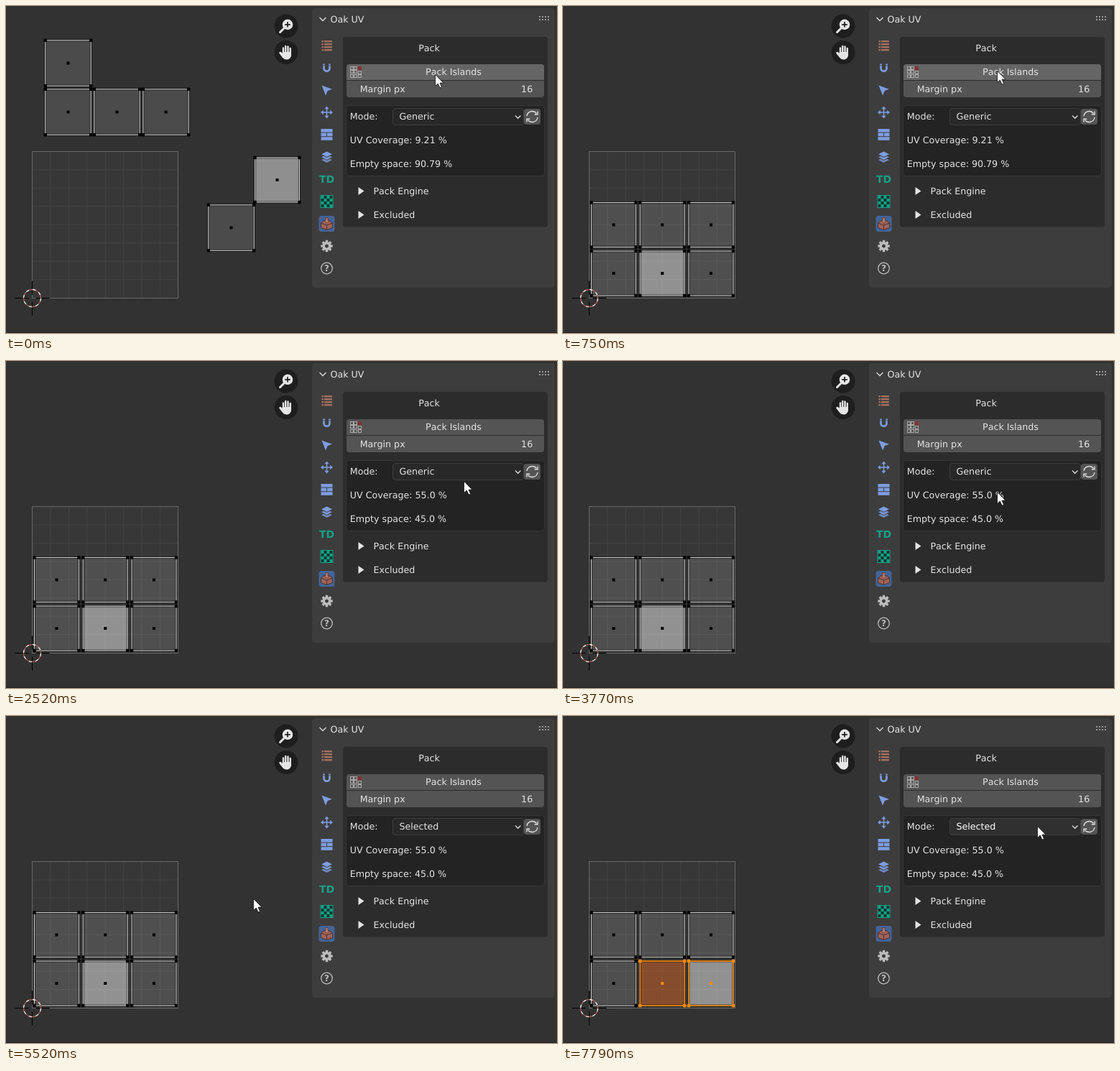
Animation, 767 px wide and 455 px high, one loop 8 s. Source, as an HTML page:

```html
<!DOCTYPE html>
<html lang="en">
<head>
<meta charset="utf-8">
<title>UV packing demo</title>
<style>
  html, body { margin: 0; width: 100%; height: 100%; overflow: hidden; background: #323232; }
  svg { display: block; width: 767px; height: 455px; }
  text {
    font: 12.65px "DejaVu Sans", sans-serif;
    font-kerning: none;
    text-rendering: geometricPrecision;
    fill: #e4e4e4;
    white-space: pre;
  }
</style>
</head>
<body>
<svg id="stage" viewBox="0 0 767 455" xmlns="http://www.w3.org/2000/svg">
  <g id="backdrop"></g>
  <g id="islands"></g>
  <g id="tools"></g>
  <g id="panel"></g>
  <g id="controls"></g>
  <g id="overlay"></g>
</svg>
<script>
const LOOP = 8000;
const BLUE = '#3d5b8f';
const $ = id => document.getElementById(id);

// time, pointer x, pointer y, button held
const steps = [
  [0, 597, 95], [250, 602, 91, 1], [500, 604, 91], [750, 604, 90],
  [1250, 628, 104], [1500, 686, 133], [1750, 737, 154], [2000, 739, 156, 1],
  [2270, 728, 157], [2520, 637, 167], [2770, 604, 188], [3020, 600, 207], [3270, 602, 223],
  [3520, 604, 208], [3770, 604, 182], [4020, 602, 155], [4270, 602, 153, 1], [4520, 602, 153],
  [4770, 602, 178], [5020, 602, 200],
  [5520, 344, 254], [5770, 300, 356], [6020, 278, 395], [6270, 180, 366, 1], [6520, 146, 355, 1],
  [6770, 146, 355], [7020, 262, 304], [7270, 462, 214], [7520, 615, 141], [7790, 660, 153]
];

// island centres before packing; the last one is the active face
const loose = [[86.5, 79.5], [86.5, 147.5], [154.5, 147.5], [222.5, 147.5], [313.5, 308.5], [377.5, 242]];
const packed = [0, 1, 2, 3, 4, 5].map(i => [70.5 + 67.75 * (i % 3), i < 3 ? 304.5 : 372]);

const rect = (x, y, w, h, fill, more = '') =>
  `<rect x="${x}" y="${y}" width="${w}" height="${h}" fill="${fill}" ${more}/>`;
const path = (d, more) => `<path d="${d}" ${more}/>`;
const line = (d, color, width = 1, more = '') =>
  path(d, `fill="none" stroke="${color}" stroke-width="${width}" ${more}`);
const fill = (d, color) => path(d, `fill="${color}"`);
const circle = (x, y, r, more) => `<circle cx="${x}" cy="${y}" r="${r}" ${more}/>`;
const text = (x, y, s, more = '') => `<text x="${x}" y="${y}" ${more}>${s}</text>`;
const at = (x, y, body, more = '') => `<g transform="translate(${x} ${y}) ${more}">${body}</g>`;
const times = (n, f) => Array.from({ length: n }, (_, i) => f(i)).join('');

function backdrop() {
  const cell = 203.5 / 8;
  let s = rect(0, 0, 767, 455, '#323232') + rect(0, 453.5, 767, 1.5, '#292627');
  s += rect(36.5, 202.5, 203, 204, '#373737');
  s += times(7, i => {
    const d = (i + 1) * cell;
    return line(`M${36.5 + d} 203V406M37 ${202.5 + d}H239`, '#434343');
  });
  return s + rect(36.5, 202.5, 203, 204, 'none', 'stroke="#686868"');
}

function originMark() {
  const ring = (color, offset) =>
    circle(0, 0, 12, `fill="none" stroke="${color}" stroke-width="1.4" stroke-dasharray="4.71" stroke-dashoffset="${offset}"`);
  return at(36.5, 406.5, line('M-24 0H-5M5 0H24M0 -24V-5M0 5V24', '#000') + ring('#f4eaea', 0) + ring('#a8585c', 4.71));
}

function island([x, y], half, look) {
  const chosen = look.selected;
  const ink = chosen ? '#f58a0c' : '#000';
  const tint = look.active ? 'rgba(255,255,255,.45)' : chosen ? 'rgba(211,99,37,.5)' : 'rgba(255,255,255,.12)';
  const box = (f, more) => rect(-half, -half, 2 * half, 2 * half, f, more);
  const corner = (cx, cy) => chosen
    ? circle(cx, cy, 2.5, `fill="${ink}"`)
    : rect(cx - 2.2, cy - 2.2, 4.4, 4.4, ink, 'rx=".8"');
  return at(x, y,
    box(tint) +
    box('none', 'stroke="#000" stroke-opacity=".55" stroke-width="3"') +
    box('none', `stroke="${chosen ? ink : '#cfcfcf'}" stroke-width="${chosen ? 1.7 : 1.1}"`) +
    [-half, half].map(a => corner(a, -half) + corner(a, half)).join('') +
    rect(-2, -2, 4, 4, ink));
}

function viewButtons() {
  const disc = y => circle(390, y, 16.5, 'fill="#1e1e1e"');
  const lens = line('M386.5 31.5L381.5 36.5', '#e6e6e6', 3, 'stroke-linecap="round"') +
    circle(392, 25.8, 7.3, 'fill="#e6e6e6"') + line('M392 22V29.6M388.2 25.8H395.8', '#1e1e1e', 1.7);
  const hand = line('M386 66V58.5M389.2 64V56M392.5 64V56.5M395.8 66V59', '#e6e6e6', 2.4, 'stroke-linecap="round"') +
    fill('M384.8 64H397V68C397 72 394 74.5 391 74.5C387.5 74.5 386 73 384 70.5L380.5 66C379.5 64.5 381.5 63 383 64.3L384.8 66Z', '#e6e6e6');
  return disc(28) + lens + disc(64.5) + hand;
}

function toolIcons() {
  const blue = '#7d9de0', green = '#16a085', rust = '#a4705f', grey = '#bdbdbd';
  const arm = fill('M0 -8.5L3.2 -4.7H.8V0H-.8V-4.7H-3.2Z', blue);
  const sheet = (y, o) => path(`M0 ${y - 4.2}L8.5 ${y}L0 ${y + 4.2}L-8.5 ${y}Z`,
    `fill="${blue}" stroke="#3d3d3d" stroke-width="1" opacity="${o}"`);
  const icons = [
    times(4, i => rect(-7, -7 + i * 4, 2.4, 2.4, rust) + rect(-3.6, -7 + i * 4, 11, 2.4, rust)),
    line('M-4 -5.5V.7A4 4 0 0 0 4 .7V-5.5', blue, 2.7) + line('M-5.5 -3.2H-2.5M2.5 -3.2H5.5', '#3d3d3d', .8),
    fill('M-7 -6.5L7.5 -1.2L1.2 1L-1.5 7.5Z', blue),
    times(4, i => at(0, 0, arm, `rotate(${i * 90})`)),
    rect(-8, -8, 16, 4.6, blue) + rect(-8, -2.4, 7.5, 4.6, blue) + rect(.5, -2.4, 7.5, 4.6, blue) + rect(-8, 3.2, 16, 4.6, blue),
    sheet(4.2, .8) + sheet(.3, .9) + sheet(-3.8, 1),
    text(0, 5.2, 'TD', `text-anchor="middle" style="font-weight:bold;font-size:14px;fill:${green}"`),
    rect(-8.5, -8.5, 17, 17, '#12382f') + rect(-8.5, -8.5, 17, 17, 'none', `stroke="${green}"`) +
      times(16, i => (i + (i >> 2)) % 2 ? '' : rect(-8 + (i % 4) * 4, -8 + (i >> 2) * 4, 4, 4, green)),
    rect(-11, -11, 22, 22, '#436499', 'rx="3.5"') +
      path('M-8 -1L-4.5 -4H4.5L8 -1V5.5L0 8.5L-8 5.5Z', 'fill="#a06357" stroke="#49302f" stroke-width="1"') +
      line('M-8 -1L0 2L8 -1M0 2V8', '#49302f') +
      path('M-1.7 -8.5H1.7V-4.5H4L0 -.5L-4 -4.5H-1.7Z', 'fill="#b67a6c" stroke="#49302f" stroke-width=".7"'),
    times(8, i => rect(-1.7, -8.2, 3.4, 5, grey, `transform="rotate(${i * 45})"`)) +
      circle(0, 0, 4.3, `fill="none" stroke="${grey}" stroke-width="3.6"`),
    circle(0, 0, 7.8, `fill="none" stroke="${grey}" stroke-width="1.3"`) +
      text(0, 4.4, '?', `text-anchor="middle" style="font-weight:bold;font-size:12px;fill:${grey}"`)
  ];
  return icons.map((icon, i) => at(446.5, 55 + i * 31, icon)).join('');
}

function panel() {
  const fold = y => fill(`M490.5 ${y - 5.5}L498.5 ${y}L490.5 ${y + 5.5}Z`, '#e4e4e4');
  return rect(426, 3, 338, 389, '#3d3d3d', 'rx="4"') +
    line('M436.5 16L441 20.5L445.5 16', '#dcdcdc', 1.3) +
    text(451.5, 23, 'Oak UV') +
    times(8, i => rect(742 + (i % 4) * 4, i < 4 ? 14 : 18, 2, 2, '#999')) +
    rect(469, 43, 285, 264.5, '#2c2c2c', 'rx="4"') +
    text(589, 63, 'Pack', 'text-anchor="middle"') +
    rect(473.5, 138.5, 276, 98, '#232323', 'rx="4" stroke="#363636"') +
    text(478.8, 158, 'Mode:') +
    fold(257.5) + text(511.5, 262, 'Pack Engine') +
    fold(290.5) + text(511.5, 295, 'Excluded') +
    toolIcons();
}

function packIcon() {
  const d = '#a9a9a9';
  const cells = [[0, 0], [5, 0], [0, 5], [5, 5], [0, 11], [5, 11], [11, 11], [11, 6]];
  return at(479.5, 84.5,
    cells.map(([x, y]) => rect(x, y, 4, 4, 'none', `stroke="${d}" stroke-width="1"`)).join('') +
    rect(9.5, -.5, 6, 5.5, '#7d3638'));
}

function controls(t, x, y, held) {
  const inside = (l, top, r, b) => x >= l && x <= r && y >= top && y <= b;
  const shade = hover => hover ? (held ? BLUE : '#656565') : '#545454';
  const menu = t >= 4270 && t < 5520;
  const overMode = !menu && inside(539, 143, 719, 165);
  const fresh = t >= 2270;
  const over = inside(474, 81, 749, 103), overMargin = inside(474, 104, 749, 127);

  let s = path('M478 81H745Q749 81 749 85V103H474V85Q474 81 478 81Z', `fill="${shade(over)}"`) +
    path('M474 104H749V123Q749 127 745 127H478Q474 127 474 123Z', `fill="${shade(overMargin)}"`) +
    packIcon() +
    text(623, 96, 'Pack Islands', 'text-anchor="middle"') +
    text(492.7, 120, 'Margin px') + text(733.2, 120, '16', 'text-anchor="end"');

  s += rect(538.5, 142.5, 182, 23, menu ? BLUE : overMode ? '#303030' : '#282828', 'rx="3.5" stroke="#3d3d3d"') +
    text(547.4, 158, t < 5520 ? 'Generic' : 'Selected', menu || overMode ? 'style="fill:#fff"' : '') +
    line('M709 152.5L712.7 156.3L716.4 152.5', '#dcdcdc', 1.3);

  s += rect(721, 143, 23, 22, shade(inside(721, 143, 744, 165)), 'rx="3.5"') +
    at(732.5, 154, [0, 180].map(a => at(0, 0,
      line('M-7.5 -1A7.6 7.6 0 0 1 6 -4.6M7.6 -7.5V-3.2H3.2', '#dedede', 1.4), `rotate(${a})`)).join(''));

  s += text(478.8, 191, `UV Coverage: ${fresh ? '55.0' : '9.21'} %`) +
    text(478.8, 224, `Empty space: ${fresh ? '45.0' : '90.79'} %`);
  return s + (menu ? modeMenu(t, y) : '');
}

function modeMenu(t, y) {
  const rows = ['Generic', 'Selected', 'Exclude stacked'];
  return path('M539 165H720V280Q720 284 716 284H543Q539 284 539 280Z', 'fill="#181818"') +
    rows.map((label, i) => {
      const top = 168 + i * 26;
      const hover = y >= top && y < top + 26;
      return (hover ? rect(542, top, 175, 25, BLUE, 'rx="3"') : '') +
        text(550.3, top + 17, label) + rect(552.5, top + 20.5, 6.5, 1, '#cfcfcf');
    }).join('') +
    line('M539 250.5H720', '#343434') +
    text(547.8, 271, 'Mode', 'style="fill:#8e8e8e"');
}

function islands(t) {
  if (t < 500) return loose.map((p, i) => island(p, i > 4 ? 31 : 31.7, { active: i === 5 })).join('');
  const picked = t >= 6270, both = t >= 6770;
  return packed.map((p, i) => island(p, 31, {
    active: i === (picked ? 5 : 4),
    selected: picked && (i === 5 || both && i === 4)
  })).join('');
}

function overlay(t, x, y, held) {
  let s = '';
  if (held && t >= 6270) {
    const frame = `M${x + 8.5} ${y + .5}H277.5V395.5H${x + 8.5}Z`;
    s += line(frame, '#222') + line(frame, '#f0f0f0', 1, 'stroke-dasharray="4 3"');
  }
  if (held) s += circle(x - 1, y - 2, 12, 'fill="#d6cb1e" fill-opacity=".86"');
  return s + at(x, y, path('M.5 .3V16.6L4.3 13.1L7 19L9.6 17.8L7 12.1H12Z',
    'fill="#fff" stroke="#1c1c1c" stroke-width=".9" stroke-linejoin="round"'));
}

let shown;
function draw(time) {
  const now = time % LOOP;
  const step = steps.filter(s => s[0] <= now).pop();
  if (step === shown) return;
  shown = step;
  const [t, x, y, held] = step;
  $('islands').innerHTML = islands(t);
  $('controls').innerHTML = controls(t, x, y, held);
  $('overlay').innerHTML = overlay(t, x, y, held);
}

$('backdrop').innerHTML = backdrop();
$('tools').innerHTML = originMark() + viewButtons();
$('panel').innerHTML = panel();
draw(0);

const start = performance.now();
function tick() {
  draw(performance.now() - start);
  requestAnimationFrame(tick);
}
requestAnimationFrame(tick);
</script>
</body>
</html>
```
